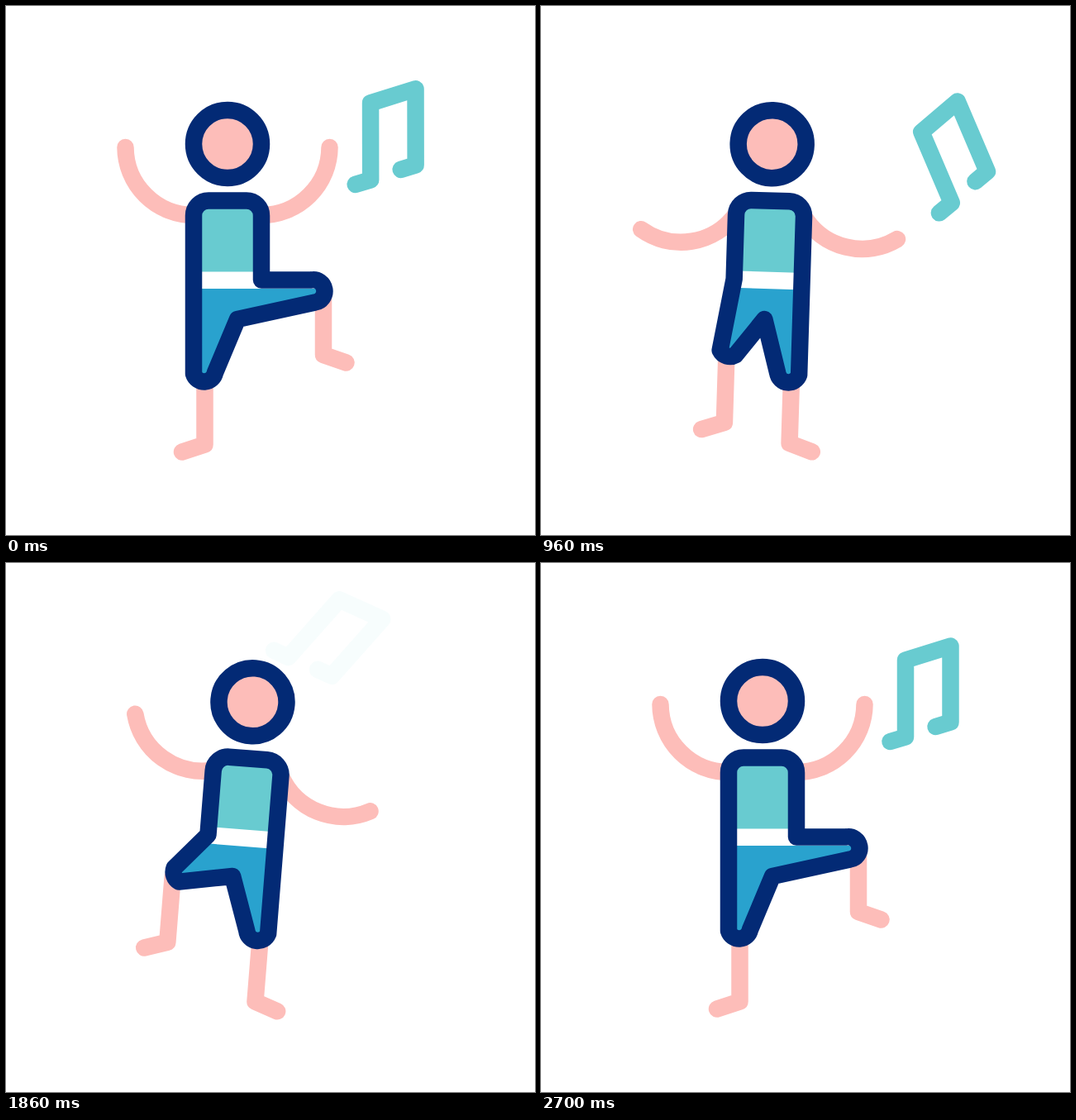
Animation, 640 px wide and 640 px high, one loop 3 s. Source, as an HTML page:

```html
<!DOCTYPE html>
<html lang="en">
<head>
<meta charset="utf-8">
<title>Dancer</title>
<style>
  html, body { margin: 0; width: 100%; height: 100%; overflow: hidden; background: #fff; }
  svg { display: block; width: 100%; height: 100%; }
  .line { fill: none; stroke-width: 20.5; stroke-linecap: round; stroke-linejoin: round; }
  .skin { stroke: #fdbdb9; }
  .navy { stroke: #032a75; }
  .teal { stroke: #68cbd0; }
</style>
</head>
<body>
<svg viewBox="0 0 640 640">
  <defs><clipPath id="inside"><path id="clip"/></clipPath></defs>
  <path id="note" class="line teal" d="M422.5 216 441 210.5V117.5L495.5 100.5V192.5L477.5 198"/>
  <g id="dancer">
    <path id="armL" class="line skin" d="M227 253A82.5 82.5 0 0 1 144.5 171"/>
    <path id="armR" class="line skin" d="M309 253A82.5 82.5 0 0 0 391.5 171"/>
    <path id="shinL" class="line skin" d="M240.5 452V530.5L213 539.5"/>
    <path id="shinR" class="line skin" d="M300 450V528L327.5 537.5"/>
    <g clip-path="url(#inside)">
      <rect x="100" y="220" width="340" height="260" fill="#fff"/>
      <rect x="100" y="220" width="340" height="101.5" fill="#68cbd0"/>
      <rect x="100" y="342" width="340" height="138" fill="#29a2ce"/>
    </g>
    <path id="body" class="line navy"/>
    <circle class="navy" cx="268" cy="167" r="41" fill="#fdbdb9" stroke-width="20.5"/>
  </g>
</svg>
<script>
const LOOP = 3000, DANCE = 2700, LEAN = 7.4, SWING = 62, FADE = 250;
const el = id => document.getElementById(id);
const turn = (id, v) => el(id).setAttribute("transform", v);
const mix = (a, b, k) => a + (b - a) * k;
const clamp = x => Math.max(0, Math.min(1, x));
const ramp = (t, a, b) => {
  const x = clamp((t - a) / (b - a));
  return x * x * (3 - 2 * x);
};
const bump = (t, a, top, hold, b) => ramp(t, a, top) * (1 - ramp(t, hold, b));

// Upright moments; between them the body sways right, left, right
const upright = [408, 1065, 1665, 2340];

function sway(t) {
  const i = upright.findIndex((a, n) => t >= a && t < upright[n + 1]);
  if (i < 0) return 0;
  const a = upright[i], b = upright[i + 1], mid = (a + b) / 2;
  return bump(t, a, mid, mid, b) * (i % 2 ? -1 : 1);
}

// Note stops: x, y, angle
const rest = [0, 0, 0], right = [56, -80, -43.5], left = [-71, -69, 42.5];
const flights = [
  { start: 0, end: 595, from: rest, to: right },
  { start: 600, end: 1130, from: [5, 136, 0], to: right, pow: 1.65 },
  { start: 1200, end: 1875, from: [-14, 136, 0], to: left },
  { start: 2150, end: DANCE, from: [-24, 123, 0], to: rest }
];

function drawNote(t) {
  const f = flights.find(f => t >= f.start && t <= f.end);
  if (!f) return el("note").setAttribute("opacity", 0);
  const p = Math.pow((t - f.start) / (f.end - f.start), f.pow || 1);
  const [x, y, a] = f.from.map((v, i) => mix(v, f.to[i], p));
  const shown = f.from === rest ? 1 : clamp((t - f.start) / FADE);
  const gone = f.to === rest ? 1 : clamp((1 - p) / 0.4);
  el("note").setAttribute("opacity", shown * gone);
  turn("note", `translate(${x} ${y}) rotate(${a} 468 155.5)`);
}

// Outer and inner side of the knee, k = 0 hanging to 1 raised
const outer = k => [mix(309, 369.5, k), mix(445, 331.5, k)];
const inner = k => [mix(283, 374, k), mix(443.5, 358.5, k)];
const flip = ([x, y]) => [536 - x, y];

function bodyPath(kL, kR) {
  const knee = "A13.4 13.4 0 0 1 ";
  return `M227 253.5A18 18 0 0 1 245 235.5H291A18 18 0 0 1 309 253.5V331.5` +
    `L${outer(kR)}${knee}${inner(kR)}L${268 + 12 * (kR - kL)} 379` +
    `L${flip(inner(kL))}${knee}${flip(outer(kL))}L227 331.5Z`;
}

function draw(t) {
  const s = sway(t);
  const kL = Math.max(0, s);
  const kR = Math.max(0, -s, 1 - ramp(t, 0, upright[0]), ramp(t, upright[3], DANCE));
  const armL = bump(t, 500, 1075, 1290, 2110) + bump(t, 2100, 2400, 2400, DANCE);
  const armR = bump(t, 408, 1080, 1080, 1400) + bump(t, 1200, 1860, 1860, 2550);
  turn("dancer", `rotate(${LEAN * s} 268 548)`);
  turn("armL", `rotate(${-SWING * armL} 227 253)`);
  turn("armR", `rotate(${SWING * armR} 309 253)`);
  turn("shinL", `translate(${-84 * kL} ${-106 * kL})`);
  turn("shinR", `translate(${84 * kR} ${-106 * kR})`);
  const d = bodyPath(kL, kR);
  el("body").setAttribute("d", d);
  el("clip").setAttribute("d", d);
  drawNote(t);
}

function tick() {
  const t = performance.now() % LOOP;
  draw(t < DANCE ? t : 0);
  requestAnimationFrame(tick);
}
tick();
</script>
</body>
</html>
```
